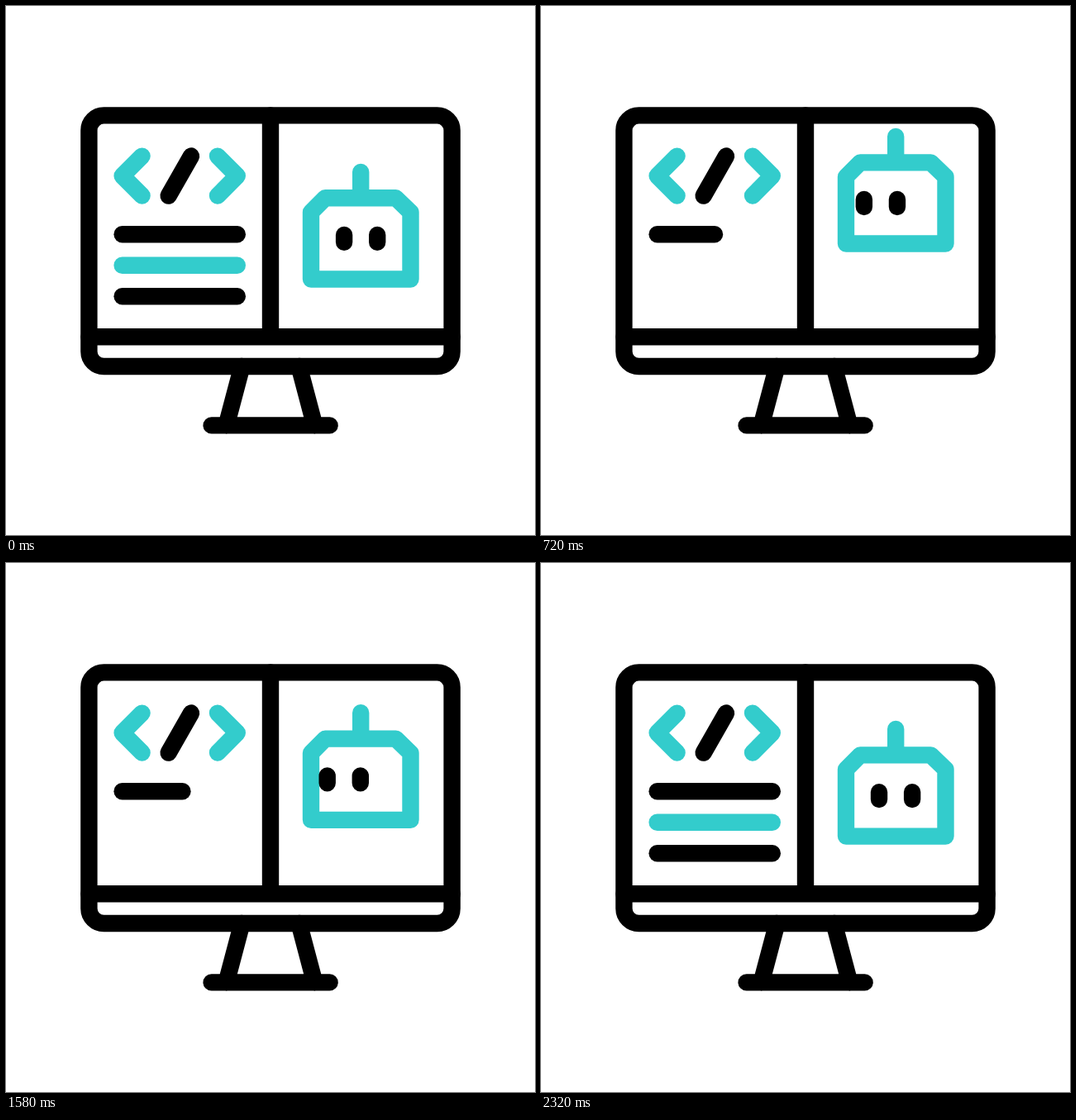
Write an HTML page that moves like this. It is 640x640 px and loops after 2400 ms.

```html
<!DOCTYPE html>
<html lang="en">
<head>
<meta charset="utf-8">
<title>Code and robot</title>
<style>
  html, body { margin: 0; width: 100%; height: 100%; overflow: hidden; background: #fff; }
  svg { display: block; width: 100%; height: 100%; }
  .ink, .teal { fill: none; stroke: #000; stroke-width: 20.4; stroke-linecap: round; stroke-linejoin: round; }
  .teal { stroke: #3cc; }
</style>
</head>
<body>
<svg viewBox="0 0 640 640">
  <g class="ink">
    <rect x="100.4" y="132.4" width="439.2" height="303.6" rx="18"/>
    <path d="M100.4 400.2H539.8M320 132.4V400.3"/>
    <path d="M285.5 436L266.6 507.4M354.5 436L373.4 507.4M248.6 507.4H391.6"/>
    <path d="M224 181.6L196.6 229.6"/>
  </g>
  <path class="teal" d="M164.6 181.6L140.6 205.5L164.6 229.5M256 181.6L279.8 205.5L256 229.5"/>
  <path class="ink line"/>
  <path class="teal line"/>
  <path class="ink line"/>
  <g id="robot">
    <path class="teal" d="M386.2 232.4H471.6L489.5 249.7V330.6H369V249.7ZM429.2 201V232.4"/>
    <path id="eyes" class="ink" d="M409.1 277.1V286M449.2 277.1V286"/>
  </g>
</svg>
<script>
const LOOP = 2400;
const LEFT = 140.6, LENGTH = 139.2, ROWS = [276.2, 313.8, 351.2];

// y of a cubic-bezier(a, 0, b, 1) curve at x
function bezier(a, b) {
  return x => {
    let lo = 0, hi = 1;
    for (let i = 0; i < 30; i++) {
      const s = (lo + hi) / 2, r = 1 - s;
      if (3 * r * r * s * a + 3 * r * s * s * b + s * s * s < x) lo = s; else hi = s;
    }
    return lo * lo * (3 - 2 * lo);
  };
}
const easeIn = p => u => u ** p;
const easeOut = p => u => 1 - (1 - u) ** p;
const sharp = bezier(0.8, 0.2);
const soft = bezier(0.333, 0.667);

// Steps: [time, value, easing towards this value]
const hop = [
  [0, 0],
  [600, -43.4, easeOut(1.85)],
  [1200, 0, easeIn(3)],
  [1520, -20.8, easeOut(2)],
  [1790, 0, easeIn(2)],
  [1945, -10, easeOut(2)],
  [2100, 0, easeIn(2)]
];
const glance = [[290, 0], [830, -20.4, soft], [1800, -20.4, soft], [2340, 0, soft]];
const typed = [[20, 3], [1140, 0.068, sharp], [1210, 0.068, sharp], [2185, 3, sharp]];

function valueAt(steps, t) {
  if (t <= steps[0][0]) return steps[0][1];
  for (let i = 1; i < steps.length; i++) {
    const [t0, v0] = steps[i - 1], [t1, v1, ease] = steps[i];
    if (t < t1) return v0 + (v1 - v0) * ease((t - t0) / (t1 - t0));
  }
  return steps[steps.length - 1][1];
}

const robot = document.getElementById("robot");
const eyes = document.getElementById("eyes");
const lines = document.querySelectorAll(".line");

function draw(t) {
  robot.setAttribute("transform", `translate(0 ${valueAt(hop, t)})`);
  eyes.setAttribute("transform", `translate(${valueAt(glance, t)} 0)`);
  const total = valueAt(typed, t);
  lines.forEach((line, i) => {
    const part = Math.min(1, total - i);
    line.setAttribute("d", part > 0 ? `M${LEFT} ${ROWS[i]}h${part * LENGTH}` : "");
  });
}

const start = performance.now();
function tick() {
  draw((performance.now() - start) % LOOP);
  requestAnimationFrame(tick);
}
tick();
</script>
</body>
</html>
```
